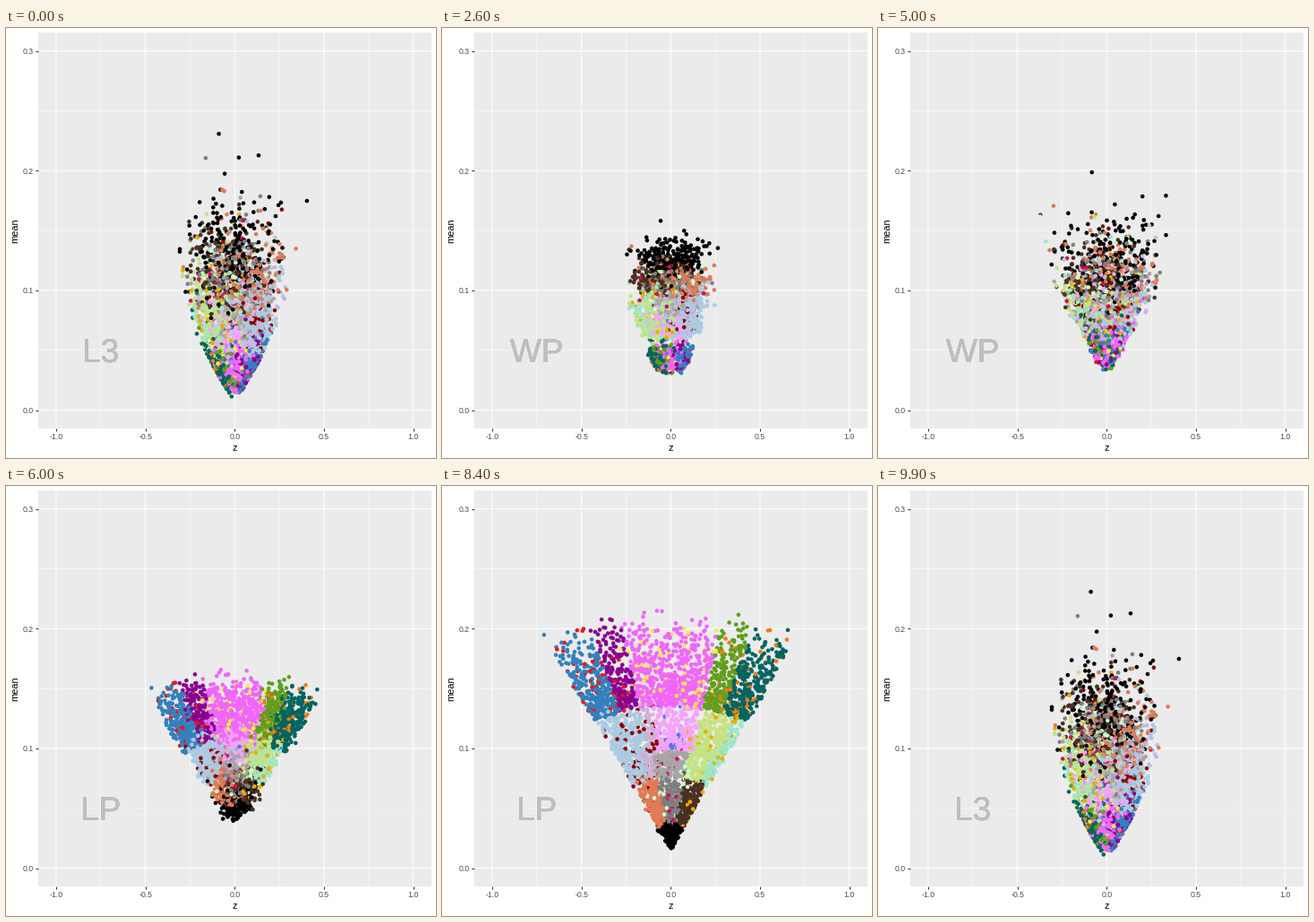
Write a matplotlib script that moves like this. It is 480 by 480 pixels and loops after 10000 ms.

```python
import numpy as np
import matplotlib.pyplot as plt
from matplotlib.animation import FuncAnimation
from matplotlib.patheffects import Normal

SIZE, FRAMES = 480, 100
plt.rcParams["font.family"] = "Liberation Sans"

# Lower case: main groups; upper case: sprinkled groups
PALETTE = {
    "k": "#000000", "s": "#e07b56", "d": "#7f7f7f", "n": "#4a3020",
    "l": "#a6a6a6", "a": "#abcbe2", "v": "#cab2d6", "i": "#f5a3ff",
    "p": "#f066ff", "y": "#c5e384", "m": "#9fe6c6", "b": "#3480bd",
    "u": "#880090", "g": "#5f9e1e", "t": "#006460", "R": "#8b0000",
    "C": "#cc1058", "W": "#ccffcc", "G": "#e6b000", "Y": "#ffe64d",
    "O": "#f07c10", "E": "#e31a1c", "Q": "#4f78f0",
}

# Layers of the LP cone: mean from, to, points, groups from left to right
BANDS = [
    (.012, .036, 330, "k", "k"),
    (.034, .080, 720, "sdn", "RWCWG"),
    (.075, .102, 700, "aavlllyym", "RRCWG"),
    (.100, .145, 950, "aaaaviiiiyyym", "RRQGG"),
    (.142, .230, 1850, "bbbuuppppppggttt", "EEYYYOO"),
]
SPRINKLE = .12

# First frame, steps, state before and after each move
MOVES = [(17, 17, 0, 1), (50, 17, 1, 2), (84, 16, 2, 0)]
NAMES = ["L3", "WP", "LP"]

rng = np.random.default_rng(7)


def pick(groups, u):
    """Group letters for positions u in -1..1 along a band."""
    cell = ((u + 1) / 2 * len(groups)).astype(int)
    return np.array(list(groups))[np.minimum(cell, len(groups) - 1)]


def lp_cone():
    """Position u across the cone, mean, band centre and colour of all points."""
    parts = []
    for lo, hi, n, main, rare in BANDS:
        u = rng.uniform(-1, 1, n)
        # Tall bands thin out upwards
        mean = lo + (hi - lo) * rng.beta(1, 1 + 12 * (hi - lo), n)
        letters = np.where(rng.random(n) < SPRINKLE,
                           pick(rare, u), pick(main, u))
        centre = np.full(n, lo + .4 * (hi - lo))
        colors = np.array([PALETTE[c] for c in letters])
        parts.append((u, mean * (1 - .1 * u ** 2), centre, colors))
    return [np.concatenate(p) for p in zip(*parts)]


def mixed(u, centre, tip, width, spread, noise):
    """Noisy cloud in a cone whose sides bend upwards."""
    skew = .2 + 2.5 * np.maximum(0, .1 - centre)
    mean = tip + (centre - tip) * np.exp(skew * noise)
    u = u + rng.normal(0, spread, u.size)
    u = np.where(abs(u) > 1, np.sign(u) * rng.uniform(.5, 1, u.size), u)
    z = u * width * np.tanh(4 / width * (mean - tip))
    return np.column_stack([z, mean])


def build():
    u, mean, centre, colors = lp_cone()
    lp = np.column_stack([u * 3.9 * (mean - .01), mean])
    # The other two states turn the order of LP upside down and mirror it
    flip = -5 * centre * u
    high = rng.normal(size=u.size)
    low = -.75 * high + .66 * rng.normal(size=u.size)
    l3 = mixed(flip, .138 - .6 * centre, .006, .45, .3, high)
    wp = mixed(.6 * flip, .13 - .48 * centre, .018, .55, .36, low)
    order = rng.permutation(u.size)
    return [s[order] for s in (l3, wp, lp)], colors[order]


states, colors = build()

fig = plt.figure(figsize=(SIZE / 72, SIZE / 72), dpi=72, facecolor="white")
ax = fig.add_axes([36 / SIZE, 1 - 446.6 / SIZE, 438.6 / SIZE, 441.1 / SIZE],
                  facecolor="#ebebeb")
ax.set(xlim=(-1.1, 1.1), ylim=(-.015, .315))
ax.set_axisbelow(True)
ax.spines[:].set_visible(False)

for axis, lo, hi, step in [(ax.xaxis, -1, 1, .5), (ax.yaxis, 0, .3, .1)]:
    major = np.arange(lo, hi + step / 2, step)
    axis.set_ticks(major, labels=[f"{v:.1f}" for v in major])
    axis.set_ticks(major[:-1] + step / 2, minor=True)
    axis.grid(which="major", color="white", lw=1.07, snap=False)
    axis.grid(which="minor", color="white", lw=.53, snap=False)
ax.tick_params(length=2.74, width=1.07, color="#333333", pad=2.2,
               labelcolor="#4d4d4d", labelsize=8.8)
ax.tick_params(which="minor", length=0)

fig.text(255.3 / SIZE, 1 - 471.5 / SIZE, "z", size=11, ha="center")
fig.text(13 / SIZE, 1 - 226 / SIZE, "mean", size=11, rotation=90,
         rotation_mode="anchor", ha="center", va="baseline")
# Repeated drawing gives the label its hard edges
label = fig.text(105.6 / SIZE, 1 - 373 / SIZE, "L3", size=37, color="#bebebe",
                 ha="center", path_effects=[Normal()] * 8)
dots = ax.scatter(*states[0].T, s=21, c=colors, linewidths=0, zorder=3)


def draw(i):
    old = new = 0
    t = 0
    for start, steps, a, b in MOVES:
        if i >= start:
            old, new, t = a, b, min(1, (i - start + 1) / steps)
    dots.set_offsets((1 - t) * states[old] + t * states[new])
    label.set_text(NAMES[new if t >= .5 else old])
    return dots, label


anim = FuncAnimation(fig, draw, frames=FRAMES, interval=100,
                     repeat=True, repeat_delay=0)
plt.show()
```
